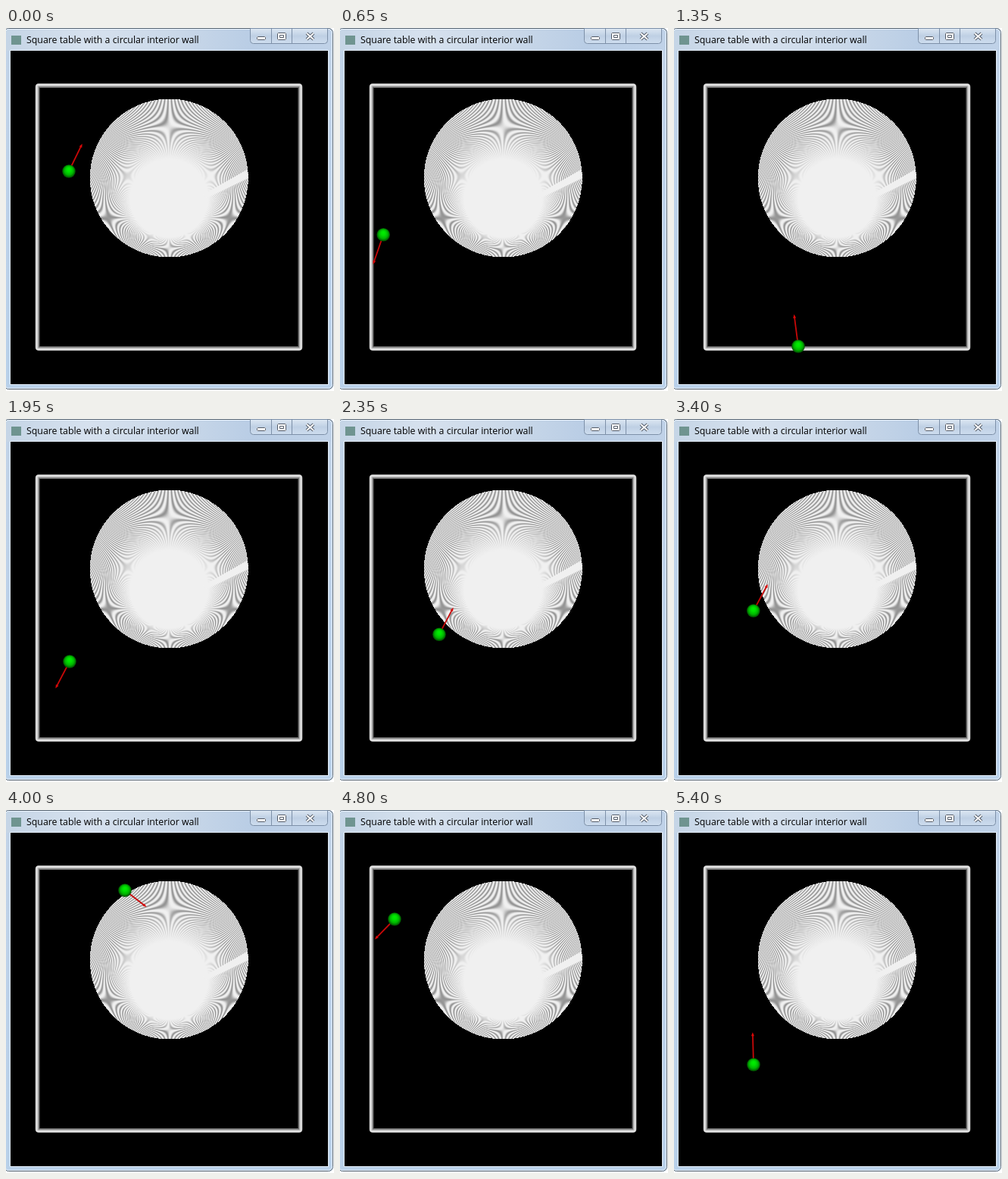
These frames come from a looping animation (433 by 479 pixels, 5.45 s). An HTML page with a canvas:

```html
<!DOCTYPE html>
<html>
<head>
<meta charset="utf-8">
<style>
  html, body { margin: 0; width: 100%; height: 100%; overflow: hidden; background: #fff; }
  canvas { display: block; }
</style>
</head>
<body>
<canvas id="stage" width="433" height="479"></canvas>
<script>
const W = 433, H = 479, STEP = 50, STEPS = 109;
const ctx = document.getElementById('stage').getContext('2d');
const backdrop = document.createElement('canvas');
backdrop.width = W;
backdrop.height = H;

// Billiard table: limits for the ball centre, the round wall, speed per step
const LEFT = 45, RIGHT = 385, TOP = 79, BOTTOM = 420;
const disc = { x: 215.3, y: 198, r: 104.5, bounce: 109 };
const SPEED_X = 28, SPEED_Y = 36, ARROW = 1.19, SUBSTEPS = 20;

// Key poses: step, x, y, heading in degrees; bounces in between are simulated
const poses = [
  [0, 83, 189, -58], [11, 80, 207, 114], [27, 164, 420, -99.5], [39, 84, 320, 124],
  [56, 117, 332, -49.5], [80, 157, 106, 31], [96, 72, 144, 141.5], [108, 105, 336, -92]
];

function vertical(g, y0, y1, ...colors) {
  const grad = g.createLinearGradient(0, y0, 0, y1);
  colors.forEach((c, i) => grad.addColorStop(i / (colors.length - 1), c));
  return grad;
}

function box(g, x, y, w, h, r, width, color) {
  g.beginPath();
  g.roundRect(x, y, w, h, r);
  g.lineWidth = width;
  g.strokeStyle = color;
  g.stroke();
}

function line(g, color, width, x0, y0, x1, y1) {
  g.strokeStyle = color;
  g.lineWidth = width;
  g.beginPath();
  g.moveTo(x0, y0);
  g.lineTo(x1, y1);
  g.stroke();
}

function drawWindow(g) {
  g.fillStyle = '#fff';
  g.fillRect(0, 0, W, H);
  g.fillStyle = vertical(g, 0, 477, '#c3d4e8', '#bdd2ea', '#b9d1ea');
  g.beginPath();
  g.roundRect(-2, 0, 434, 477, 6);
  g.fill();
  const title = g.createLinearGradient(0, 0, W, 0);
  ['#c5d5e6', '#d6e1ee', '#cbd9e9', '#b9cde5', '#c0d2e8'].forEach((c, i) => title.addColorStop(i / 4, c));
  g.fillStyle = title;
  g.fillRect(0, 2, 431, 28);
  box(g, -2.5, .5, 434, 476, 6, 1, '#52606e');
  box(g, -1.5, 1.5, 432, 474, 5, 1, '#eaf3fc');
  g.fillStyle = '#e4eef8';
  g.fillRect(5, 29, 421, 442);
  g.fillStyle = '#000';
  g.fillRect(6, 30, 419, 440);

  g.fillStyle = '#6f9490';
  g.fillRect(7, 10, 13, 12);
  g.font = '12.35px "Open Sans", "Noto Sans", sans-serif';
  g.fillStyle = '#000';
  g.fillText('Square table with a circular interior wall', 27, 20);

  const ink = '#535b68', edge = '#7d90a8';
  g.fillStyle = vertical(g, 1, 20, '#dbe6f2', '#bfd0e4', '#cddcee');
  g.beginPath();
  g.roundRect(322.5, .5, 102, 20, [0, 0, 4, 4]);
  g.fill();
  box(g, 322.5, .5, 102, 20, [0, 0, 4, 4], 1, edge);
  line(g, edge, 1, 350.5, 1, 350.5, 20);
  line(g, edge, 1, 377.5, 1, 377.5, 20);
  g.fillStyle = '#fff';
  g.fillRect(331, 11, 12, 5);
  g.fillRect(358, 6, 12, 10);
  box(g, 331.5, 11.5, 11, 4, 1, 1, ink);
  box(g, 358.5, 6.5, 11, 9, 1, 1, ink);
  box(g, 361.5, 9.5, 5, 3, 0, 1, ink);
  for (const [color, width] of [[ink, 4], ['#fff', 2]]) {
    line(g, color, width, 397, 7, 406, 15);
    line(g, color, width, 406, 7, 397, 15);
  }
}

function drawWalls(g) {
  box(g, 41.5, 76, 347, 347, 2, 6, '#6c6c6c');
  box(g, 41, 75.5, 348, 348, 2, 4, '#b4b4b4');
  box(g, 40.5, 75, 349, 349, 2, 2, '#e4e4e4');
}

// Inside of a cylinder in perspective: fine facets run to the vanishing point
function drawCylinder(g) {
  const { x: cx, y: cy, r: R } = disc, drop = 52.5, facets = 502;
  const img = g.getImageData(0, 0, W, H);
  for (let y = 93; y < 304; y++) {
    for (let x = 110; x < 321; x++) {
      const px = x + .5 - cx, py = y + .5 - cy;
      if (px * px + py * py > R * R) continue;
      const dy = py - drop, r = Math.hypot(px, dy) || 1;
      const ux = px / r, uy = dy / r;
      const reach = -uy * drop + Math.sqrt((uy * drop) ** 2 + R * R - drop * drop);
      const phi = Math.atan2(drop + reach * uy, reach * ux);
      const depth = Math.max(0, Math.min(1, (r / reach - .49) * 3.5));
      const dark = .5 - .5 * Math.cos(facets * (phi + Math.PI / 2));
      const v = 240 - 92 * depth * dark ** 1.5;
      img.data.set([v, v, v, 255], (y * W + x) * 4);
    }
  }
  g.putImageData(img, 0, 0);
  g.fillStyle = '#f0f0f0';
  g.beginPath();
  [[258, 221], [318, 187], [320, 198], [266, 224]].forEach(p => g.lineTo(...p));
  g.fill();
}

// Trace the bounces forwards or backwards from the nearest key pose
function ballAt(step) {
  const gap = pose => Math.abs(step - pose[0]);
  let [from, x, y, heading] = poses.reduce((a, b) => gap(b) < gap(a) ? b : a);
  const dir = step < from ? -1 : 1, dt = 1 / SUBSTEPS;
  let ux = Math.cos(heading * Math.PI / 180) * dir;
  let uy = Math.sin(heading * Math.PI / 180) * dir;
  for (let n = Math.abs(step - from) * SUBSTEPS; n > 0; n--) {
    x += ux * SPEED_X * dt;
    y += uy * SPEED_Y * dt;
    if (x < LEFT) ux = Math.abs(ux);
    if (x > RIGHT) ux = -Math.abs(ux);
    if (y < TOP) uy = Math.abs(uy);
    if (y > BOTTOM) uy = -Math.abs(uy);
    const dx = x - disc.x, dy = y - disc.y, d = Math.hypot(dx, dy);
    const inward = (ux * dx + uy * dy) / d;
    if (d < disc.bounce && inward < 0) {
      ux -= 2 * inward * dx / d;
      uy -= 2 * inward * dy / d;
    }
  }
  return { x, y, ax: ux * dir * SPEED_X * ARROW, ay: uy * dir * SPEED_Y * ARROW };
}

function drawBall({ x, y, ax, ay }) {
  const tipX = x + ax, tipY = y + ay, n = Math.hypot(ax, ay), ux = ax / n, uy = ay / n;
  line(ctx, '#c80808', 1.8, x, y, tipX - ux * 3, tipY - uy * 3);
  ctx.fillStyle = '#d80808';
  ctx.beginPath();
  ctx.moveTo(tipX, tipY);
  ctx.lineTo(tipX - ux * 5 - uy * 2, tipY - uy * 5 + ux * 2);
  ctx.lineTo(tipX - ux * 5 + uy * 2, tipY - uy * 5 - ux * 2);
  ctx.fill();
  const shade = ctx.createRadialGradient(x, y - 3, 0, x, y, 9);
  ['#00f000', '#00e000', '#00b400', '#004400'].forEach((c, i) => shade.addColorStop(i / 3, c));
  ctx.fillStyle = shade;
  ctx.beginPath();
  ctx.arc(x, y, 8.8, 0, 7);
  ctx.fill();
}

const bg = backdrop.getContext('2d');
drawWindow(bg);
drawWalls(bg);
drawCylinder(bg);

const start = performance.now();
function frame() {
  const step = Math.floor((performance.now() - start) / STEP) % STEPS;
  ctx.drawImage(backdrop, 0, 0);
  drawBall(ballAt(step));
  requestAnimationFrame(frame);
}
frame();
</script>
</body>
</html>
```
